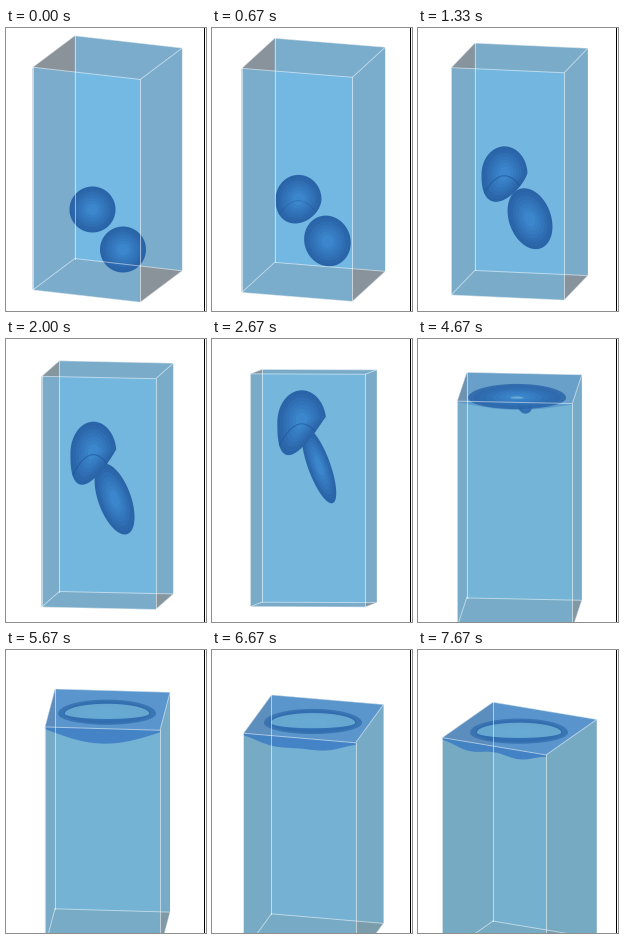
Write a matplotlib script that moves like this. It is 200 px wide and 283 px high and loops after 8 s.

```python
import numpy as np
import matplotlib.pyplot as plt
from matplotlib.animation import FuncAnimation
from matplotlib.patches import Polygon

W, H = 200, 283
STEPS, LOOP_MS, TICK_MS = 24, 8000, 50
SIDE, TALL, CENTER_X = 115.5, 233, 101.5
ANGLE = np.linspace(0, 2 * np.pi, 80)


def rgb(r, g, b):
    return np.array([r, g, b]) / 255


def mix(a, b, t):
    return a + (b - a) * t


def ease(f, start, end):
    t = np.clip((f - start) / (end - start), 0, 1)
    return t * t * (3 - 2 * t)


def dome(x, y, rx, ry, base=1.0, shear=0.0):
    """Ellipse whose lower half is flattened and pulled down on the left."""
    dx, dy = rx * np.cos(ANGLE), ry * np.sin(ANGLE)
    below = np.clip(np.sin(ANGLE), 0, 1)
    dy = np.where(dy > 0, dy * base, dy) - shear * dx * np.sqrt(below)
    return np.column_stack([x + dx, y + dy])


def spindle(x, y, length, width, tilt):
    a, b = length * np.cos(ANGLE), width * np.sin(ANGLE)
    c, s = np.cos(tilt), np.sin(tilt)
    return np.column_stack([x + a * c - b * s, y + a * s + b * c])


fig = plt.figure(figsize=(W / 100, H / 100), dpi=100, facecolor="white")
ax = fig.add_axes([0, 0, 1, 1])


def fill(points, color, alpha=1.0, clip=None):
    patch = Polygon(points, closed=True, fc=color, ec="none", alpha=alpha)
    ax.add_patch(patch)
    if clip is not None:
        patch.set_clip_path(clip)
    return patch


def line(points, color, alpha, width=0.7, clip=None):
    drawn, = ax.plot(*np.transpose(points), color=color, alpha=alpha, lw=width)
    if clip is not None:
        drawn.set_clip_path(clip)


def shaded(outline, alpha=1.0):
    dark, light = rgb(42, 100, 168), rgb(60, 136, 206)
    body = fill(outline, dark, alpha)
    middle = outline.mean(axis=0)
    for t in np.linspace(0.15, 1, 6):
        fill(mix(outline, middle, 0.75 * t), mix(dark, light, t), alpha * 0.8, body)
    return body


def box(f):
    """Corners of the top and bottom faces, orthographic view."""
    a = np.radians(np.interp(f, [0, 4, 8, 11, 17, 20, 23],
                             [-21.3, -11.8, -5.8, 4.5, 5, 14, 26]))
    e = np.radians(mix(-17, 20, ease(f, 0, 18.5)))
    cy = 141 + 47 * (f / (STEPS - 1)) ** 1.65
    u = SIDE / 2 * np.array([np.cos(a), np.sin(a) * np.sin(e)])
    v = SIDE / 2 * np.array([-np.sin(a), np.cos(a) * np.sin(e)])
    half = np.array([0, TALL / 2 * np.cos(e)])
    ring = np.array([-u - v, u - v, u + v, v - u]) + (CENTER_X, cy)
    return ring - half, ring + half


def draw_faces(top, bottom, late):
    walls = [np.array([top[i], top[i - 1], bottom[i - 1], bottom[i]]) for i in range(4)]
    gray = mix(rgb(100, 112, 122), rgb(78, 126, 146), late)
    blue = mix(rgb(70, 163, 220), rgb(72, 152, 192), late)
    for face in (walls[0], walls[2], top, bottom):
        fill(face, gray, 0.5)
    for face in (walls[1], walls[3]):
        fill(face, blue, 0.5)


def draw_pool(f, top, pooled):
    """Layer that collects under the lid and sags along its front edge."""
    fill(top, rgb(55, 125, 215), 0.45 * pooled)
    settle = ease(f, 17, 23)
    t = np.linspace(0, 1, 40)
    edge = mix(top[3], top[2], t[:, None])
    depth = pooled * (2 + mix(13, 4, settle) * np.sin(np.pi * t)
                      + 2 * settle * (1 - np.cos(4 * np.pi * t)))
    sag = edge + np.column_stack([0 * t, depth])
    fill(np.vstack([edge, sag[::-1]]), rgb(55, 120, 195), 0.8 * pooled)


def draw_bubbles(f, surface, pooled):
    lift, spread = ease(f, 0, 8), ease(f, 7, 14)

    melt = ease(f, 9, 16)
    if melt < 1:
        y = mix(221.5, surface + 16, ease(f, 0, 15))
        length = (23 + 17 * lift) * (1 - melt)
        width = mix(23, 7, ease(f, 2, 11))
        shaded(spindle(mix(117, 107, lift), y, length, width, np.radians(70)),
               1 - ease(f, 13, 16))

    x = mix(86.5, 101, ease(f, 4, 17))
    y = mix(181.5, surface + mix(16, 4, pooled), ease(f, 0, 12))
    rx, ry = mix(23, 49, spread), mix(23 + 10 * lift, 14, spread)
    cap = shaded(dome(x, y, rx, ry, 1 - 0.2 * lift, lift * (1 - spread)),
                 1 - 0.35 * pooled)

    s = np.linspace(-1, 1, 30)
    rim = np.column_stack([x + rx * s, y + ry * (0.05 + 0.8 * s**2)])
    line(rim, rgb(30, 80, 150), 0.55 * ease(f, 0, 4) * (1 - spread), 0.9, cap)

    opening = ease(f, 13, 17)
    if opening:
        fill(dome(x, y, 0.86 * rx * opening, 0.7 * ry * opening, 0.55),
             rgb(112, 178, 214), 0.85)


def draw(tick):
    f = int(((tick + 1) * TICK_MS - 1) * STEPS / LOOP_MS)
    ax.clear()
    ax.set(xlim=(0, W), ylim=(H, 0))
    ax.axis("off")
    top, bottom = box(f)
    pooled = ease(f, 11, 17)

    draw_faces(top, bottom, f / (STEPS - 1))
    draw_pool(f, top, pooled)
    draw_bubbles(f, top[:, 1].mean(), pooled)
    for ring in (top, bottom):
        line(np.vstack([ring, ring[:1]]), "white", 0.5)
    for a, b in zip(top, bottom):
        line([a, b], "white", 0.55)
    fill([(198, 0), (199, 0), (199, H), (198, H)], "black")
    return []


animation = FuncAnimation(fig, draw, frames=LOOP_MS // TICK_MS, init_func=lambda: [],
                          interval=TICK_MS, repeat=True, repeat_delay=0)
plt.show()
```
